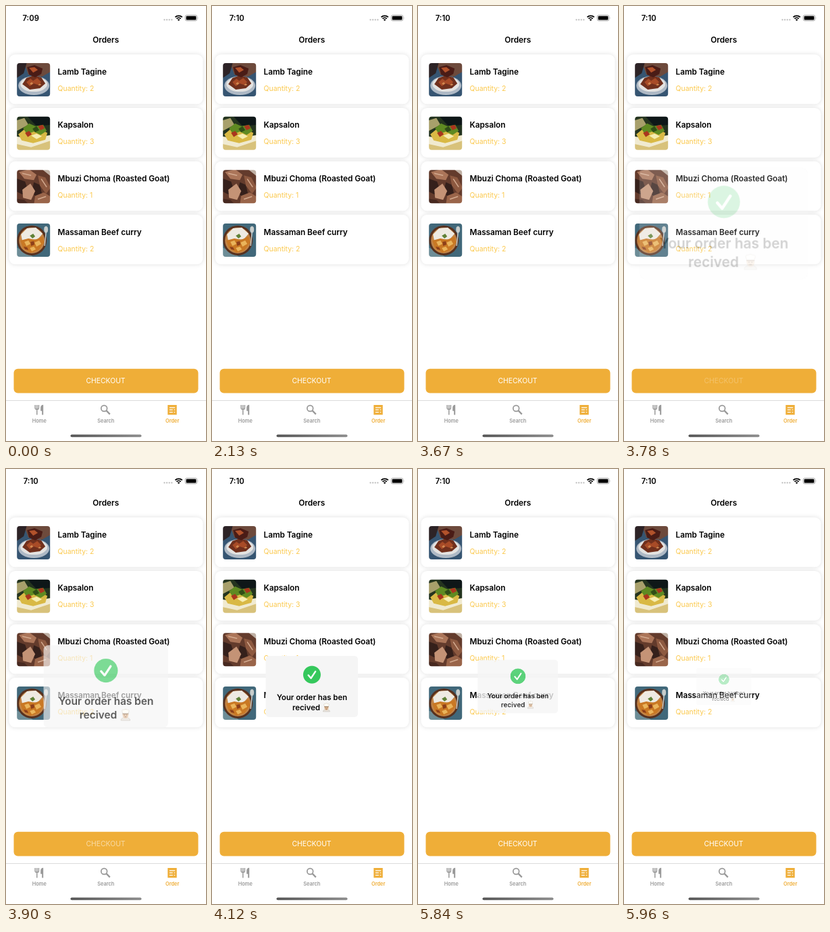
An HTML page for the animation above (5980 ms loop, 296x640 px).

```html
<!DOCTYPE html>
<html lang="en">
<head>
<meta charset="utf-8">
<title>Orders</title>
<style>
  html, body { margin: 0; width: 100%; height: 100%; overflow: hidden; background: #fff; }
  svg { display: block; width: 100vw; height: 100vh; }
  text { font-family: Inter, "Noto Sans", sans-serif; }
  .mid { text-anchor: middle; }
  .clock { font-size: 11.3px; font-weight: 600; }
  .title { font-size: 11.8px; font-weight: 600; }
  .name { font-size: 11.8px; font-weight: 600; letter-spacing: -.05px; }
  .qty { font-size: 10.4px; fill: #fbc94e; }
  .cta { font-size: 10.4px; fill: #fff; }
  .tab { font-size: 7.4px; font-weight: 600; fill: #999; }
  .note { font-size: 11.4px; font-weight: 600; }
  .card { fill: #fff; filter: drop-shadow(0 0 3px rgba(0, 0, 0, .13)); }

  /* Every track steps hard from one pose to the next. */
  .before, .after, .cta, .toast { animation: 5980ms step-end infinite; }
  .before { animation-name: before; }
  .after { animation-name: after; }
  .cta { animation-name: press; }
  .toast { animation-name: toast; transform-origin: 148px 320px; }

  @keyframes before { 0% { opacity: 1 } 35.619%, 100% { opacity: 0 } }
  @keyframes after { 0% { opacity: 0 } 35.619%, 100% { opacity: 1 } }
  @keyframes press {
    0% { opacity: 1 }
    63.211% { opacity: .25 }
    65.217% { opacity: .55 }
    67.057% { opacity: .9 }
    68.896%, 100% { opacity: 1 }
  }
  @keyframes toast {
    0% { opacity: 0; transform: scale(2) }
    63.211% { opacity: .18; transform: scale(1.83) }
    65.217% { opacity: .65; transform: scale(1.35) }
    67.057% { opacity: .94; transform: scale(1.06) }
    68.896% { opacity: 1; transform: scale(1) }
    97.659% { opacity: .8; transform: scale(.87) }
    99.666%, 100% { opacity: .35; transform: scale(.6) }
  }
</style>
</head>
<body>
<svg viewBox="0 0 296 640">
  <defs>
    <clipPath id="thumb"><rect width="49" height="49" rx="4"/></clipPath>
    <linearGradient id="bar"><stop stop-color="#555"/><stop offset="1" stop-color="#8c8c8c"/></linearGradient>
    <filter id="soft"><feGaussianBlur stdDeviation=".6"/></filter>

    <g id="tagine">
      <path fill="#365572" d="M-2-2h53v53h-53z"/>
      <path fill="#6d4a3c" d="M10-2h41v14l-14 8-20-3z"/>
      <path fill="#2d2326" d="M-2-2h17l-5 17-12 8z"/>
      <ellipse cx="25" cy="33" rx="23" ry="14" fill="#aeb9c5"/>
      <ellipse cx="25" cy="31" rx="20" ry="11" fill="#e4e3e1"/>
      <path fill="#70301d" d="M8 31l6-9 11-4 11 3 6 9-8 7-15 2z"/>
      <path fill="#a84b27" d="M14 28l6-5 4 3 6-4 6 6-5 4-6-2-6 4z"/>
      <path fill="#4a1c16" d="M15 6l11-3 12 5-2 8-9 5-9-4z"/>
      <path fill="#b2522b" d="M18 7l8-1 5 4-7 4z"/>
      <path fill="#d18a52" d="M19 30l3-2 2 2-3 2zM31 32l3-2 2 2-3 1z"/>
    </g>

    <g id="kapsalon">
      <path fill="#24341f" d="M-2-2h53v53h-53z"/>
      <path fill="#0e1718" d="M14-2h37v14l-22 2z"/>
      <path fill="#a8a06b" d="M-2 6l13-4 6 10-19 10z"/>
      <path fill="#f0ead0" d="M-2 29l20 3 33-5v16l-31 8H-2z"/>
      <path fill="#d8c27b" d="M-2 40l23 5 30-10v16H-2z"/>
      <path fill="#d9b945" d="M2 26l11-9 17-1 15 8-3 10-18 5-17-4z"/>
      <path fill="#5f8a22" d="M9 17l9-7 9 4 12-2 5 9-9 6-10-5-10 4z"/>
      <path fill="#a9361e" d="M12 24l6-3 4 5-6 4zM31 14l7-2 3 5-6 3z"/>
      <path fill="#f6edb0" d="M21 28l8-3 8 4-8 4z"/>
      <path fill="#304d17" d="M23 18l6-4 4 6-6 3z"/>
    </g>

    <g id="goat">
      <path fill="#633b2c" d="M-2-2h53v53h-53z"/>
      <path fill="#bfb0a4" d="M36-2h15v12z"/>
      <path fill="#35201b" d="M-2 12l14 5 5 14-9 5-10-5zM25 18l9 4 3 13-8 6-7-9z"/>
      <path fill="#ab7559" d="M3 3l15-4 11 8-4 8-14-2z"/>
      <path fill="#8d5940" d="M31 8l11 3 8 15-7 9-9-12z"/>
      <path fill="#c49376" d="M8 29l12-9 7 11-6 13-12-3z"/>
      <path fill="#9a654a" d="M27 38l13-5 11 7v11H25z"/>
      <path fill="#472920" d="M-2 42l13 2 7 7H-2z"/>
      <path fill="none" stroke="#d4ab90" stroke-width="1.5" d="M8 5l13 3M36 13l8 12M31 43l12-4"/>
    </g>

    <g id="curry">
      <path fill="#41687a" d="M-2-2h53v53h-53z"/>
      <path fill="#6d8d97" d="M-2 35l16 6 12 10H-2z"/>
      <circle cx="22" cy="25" r="22" fill="#57311f"/>
      <circle cx="22" cy="25" r="19" fill="#c28345"/>
      <path fill="#eeeae2" d="M6 16l9-9 13-1 10 9-7 8-14 1-9 2z"/>
      <path fill="#c97824" d="M5 25l12-3 10 2 11-5 2 9-8 11-12 4-11-7z"/>
      <path fill="#eab45b" d="M11 27l6-2 3 5-6 3zM26 28l7-3 3 5-7 4zM19 36l6-2 3 4-6 3z"/>
      <path fill="#8d3f1a" d="M20 27l5-1 1 5-5 2zM10 34l5 1 2 4-5-1z"/>
      <path fill="#5f8137" d="M19 18l5-3 3 4-4 3z"/>
      <ellipse cx="43" cy="9" rx="3" ry="5" fill="#c8cdcb"/>
      <path stroke="#c8cdcb" stroke-width="1.5" d="M43 13l-2 20"/>
    </g>
  </defs>

  <rect width="296" height="640" fill="#fff"/>

  <!-- Status bar -->
  <text class="clock mid before" x="36.7" y="22">7:09</text>
  <text class="clock mid after" x="36.7" y="22">7:10</text>
  <path fill="none" stroke="#c6c6c6" stroke-width="2.4" stroke-linecap="round" stroke-dasharray="0 3.6" d="M234.5 20.3h11"/>
  <g fill="none" stroke="#000" stroke-width="1.8">
    <path d="M250.4 16.4a7.5 7.5 0 0 1 10.4 0M252.4 18.6a4.6 4.6 0 0 1 6.4 0"/>
    <path fill="#000" stroke="none" d="M253.7 20.1a2.7 2.7 0 0 1 3.8 0l-1.9 2z"/>
  </g>
  <rect x="265.2" y="13.4" width="17.6" height="8.4" rx="2.4" fill="#fff" stroke="#999" stroke-width=".8"/>
  <rect x="266.6" y="14.8" width="14.8" height="5.6" rx="1.2"/>
  <path fill="#999" d="M283.8 16.2q1.4 1.4 0 2.8z"/>

  <text class="title mid" x="147.7" y="54.3">Orders</text>
  <g id="list"></g>

  <!-- Checkout -->
  <rect x="11.5" y="533.8" width="273" height="35.6" rx="6" fill="#efae38"/>
  <text class="cta mid" x="147.5" y="555.3">CHECKOUT</text>

  <!-- Tab bar -->
  <path stroke="#dcdcdc" d="M0 580.5h296"/>
  <g fill="none" stroke="#999" stroke-width="1.5">
    <path d="M43.2 587v4.5q0 2 2.6 2t2.6-2V587M45.8 587v14.5"/>
    <path fill="#999" stroke="none" d="M51.2 591q0-4 4-4.2v14.8h-2v-5.8h-2z"/>
    <circle cx="145.2" cy="592" r="4.4" stroke-width="1.7"/>
    <path stroke-width="2.2" d="M148.6 595.4l5.2 5.2"/>
  </g>
  <path fill="#efae38" d="M239.3 587h13.4v14.4h-13.4z"/>
  <path fill="none" stroke="#fff" stroke-width="1.3" d="M241.8 590.8h8.4M241.8 594.2h5M248.6 594.2h1.6M241.8 597.6h5M248.6 597.6h1.6"/>
  <text class="tab mid" x="49.3" y="612.7">Home</text>
  <text class="tab mid" x="147.7" y="612.7">Search</text>
  <text class="tab mid" x="246.2" y="612.7" style="fill:#efae38">Order</text>
  <rect x="95.5" y="630.4" width="105" height="3.8" rx="1.9" fill="url(#bar)"/>

  <!-- Confirmation -->
  <g class="toast">
    <rect x="79.5" y="275" width="136.5" height="90" rx="5" fill="#f5f5f5"/>
    <circle cx="147.9" cy="302.6" r="13" fill="#35c85c"/>
    <path fill="none" stroke="#fff" stroke-width="2.4" stroke-linecap="round" stroke-linejoin="round" d="M142.6 303.4l3.9 4.5 6.6-10"/>
    <text class="note mid" x="148" y="340.2">Your order has ben</text>
    <text class="note" x="119" y="354.8">recived</text>
    <g transform="translate(163.4 344.4)">
      <path fill="#e6e2dc" stroke="#b9b1a6" stroke-width=".4" d="M1 12.6q0-3.4 5-3.4t5 3.4z"/>
      <ellipse cx="6" cy="6.8" rx="3.2" ry="3.7" fill="#e8c3a0"/>
      <path fill="#8a6547" d="M2.7 4.8h6.6v1H2.7z"/>
      <path fill="#fffdf6" stroke="#c5bdb0" stroke-width=".4" d="M3 4.8l-.8-2.2Q2 .8 4 1q2-1.5 4 0 2-.2 1.800 1.600L9 4.800z"/>
      <path stroke="#6d4c36" stroke-width=".7" d="M4.300 6.700h1M6.700 6.700h1M4.900 8.700h2.200"/>
    </g>
  </g>
</svg>
<script>
  const orders = [
    ["Lamb Tagine", 2, "tagine"],
    ["Kapsalon", 3, "kapsalon"],
    ["Mbuzi Choma (Roasted Goat)", 1, "goat"],
    ["Massaman Beef curry", 2, "curry"]
  ];
  const pitch = 78.6;

  document.getElementById("list").innerHTML = orders.map(([name, count, photo], i) => `
    <g transform="translate(0 ${71.3 + i * pitch})">
      <rect class="card" x="4.500" width="287" height="73" rx="9"/>
      <g transform="translate(16.200 12.800)" clip-path="url(#thumb)"><use href="#${photo}" filter="url(#soft)"/></g>
      <text class="name" x="76.600" y="29.500">${name}</text>
      <text class="qty" x="76.600" y="53.500">Quantity: ${count}</text>
    </g>`).join("");
</script>
</body>
</html>
```
